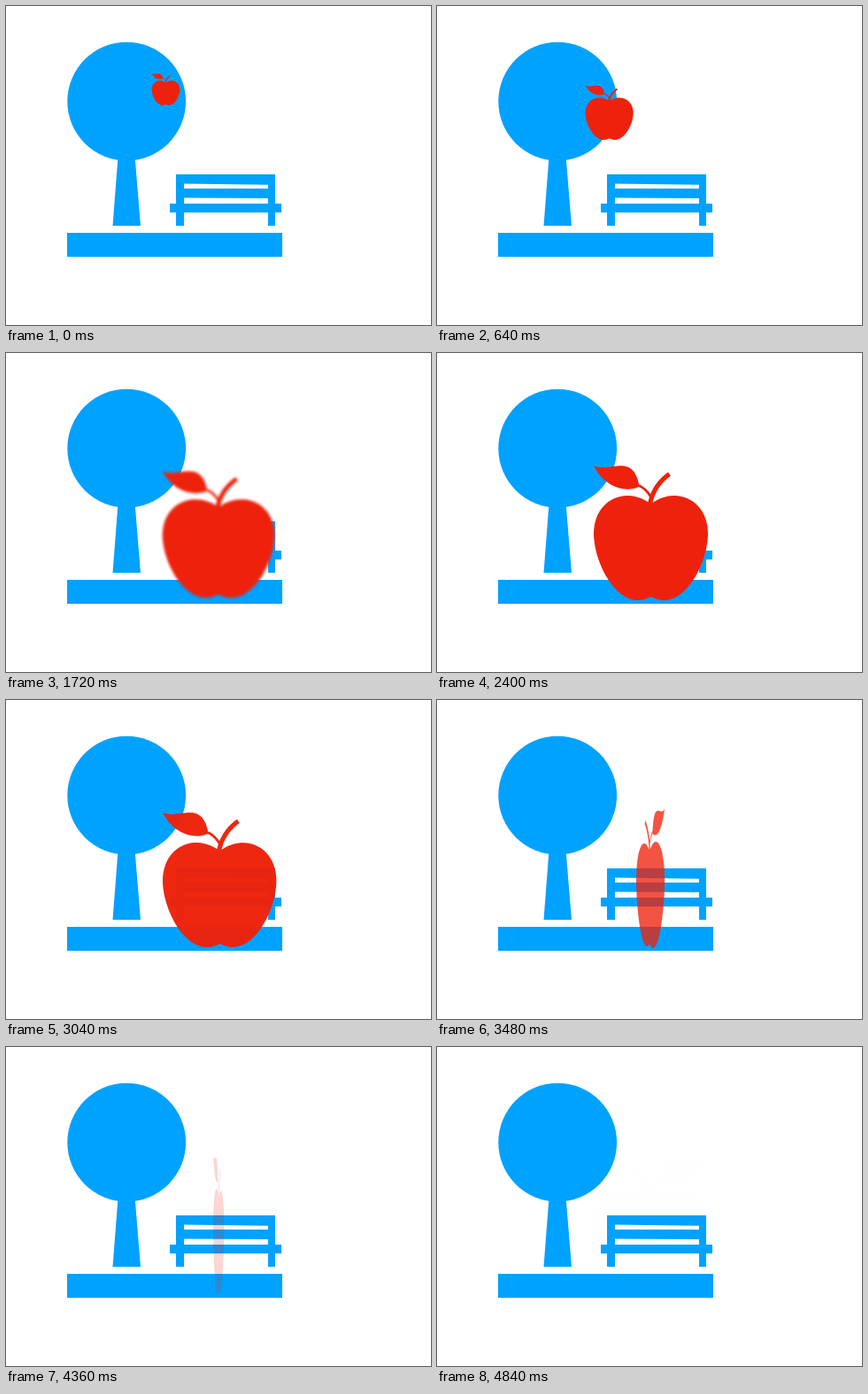
These frames come from a looping animation (480x360 px, 5.08 s). An HTML page with a canvas:

```html
<!DOCTYPE html>
<html lang="en">
<head>
<meta charset="utf-8">
<title>Apple, tree and bench</title>
<style>
  html, body { margin: 0; width: 100%; height: 100%; overflow: hidden; background: #fff; }
  canvas { display: block; width: 480px; height: 360px; }
</style>
</head>
<body>
<canvas id="stage" width="480" height="360"></canvas>
<script>
const ctx = document.getElementById('stage').getContext('2d');
const BLUE = '#00a2ff', RED = '#ee220c';
const LOOP = 5080, STEP = 40, LAST_STEP = 4840;
const VIEW_DISTANCE = 1100;
const AXIS_OFFSET = 1.1; // the apple turns slightly left of its middle
const SEGMENTS = 24;

const mix = (a, b, p) => a + (b - a) * p;
const progress = (t, from, to) => Math.min(1, Math.max(0, (t - from) / (to - from)));
const cosine = u => (1 - Math.cos(Math.PI * u)) / 2;
const smooth = u => u * u * (3 - 2 * u);
const samples = fn => Array.from({ length: SEGMENTS + 1 }, (_, i) => fn(i / SEGMENTS));

// Point on a Bezier curve with any number of control points.
function bezier(points, t) {
  if (points.length === 1) return points[0];
  const next = points.slice(1).map(([x, y], i) =>
    [mix(points[i][0], x, t), mix(points[i][1], y, t)]);
  return bezier(next, t);
}

const curve = (...points) => samples(t => bezier(points, t));

// Band of constant width along a curve.
function band(halfWidth, ...points) {
  const side = sign => samples(t => {
    const [x, y] = bezier(points, t);
    const [x2, y2] = bezier(points, t + 0.01);
    const k = sign * halfWidth / Math.hypot(x2 - x, y2 - y);
    return [x + (y2 - y) * k, y - (x2 - x) * k];
  });
  return [...side(1), ...side(-1).reverse()];
}

// Outlines around the middle of the apple.
const half = [
  ...curve([0, -32], [27, -53], [64, -38], [64.5, 1]),
  ...curve([64.5, 1], [64.5, 36], [35, 92], [0, 72.5])
];
const body = [...half, ...half.map(([x, y]) => [-x, y]).reverse()];
const leafTip = [-64.5, -75.5], leafEnd = [-13, -52];
const leaf = [
  ...curve(leafTip, [-48, -66], [-20, -92], leafEnd),
  ...curve(leafEnd, [-22, -46], [-50, -46], leafTip)
];
const stalk = band(1.4, [-14, -53], [-6, -50], [0, -40]);
const stem = band(2.6, [-1, -32], [3, -53], [21, -66]);
const apple = [body, leaf, stalk, stem];

function polygon(...points) {
  ctx.beginPath();
  points.forEach(([x, y]) => ctx.lineTo(x, y));
  ctx.fill();
}

function drawScene() {
  ctx.fillStyle = BLUE;
  ctx.beginPath();
  ctx.arc(136.2, 107.6, 66.9, 0, Math.PI * 2);
  ctx.fill();
  polygon([126.5, 170], [145.6, 170], [152, 248], [120.5, 248]);

  ctx.fillRect(192, 190, 9, 58);
  ctx.fillRect(296, 190, 8, 58);
  polygon([200, 190], [297, 190], [297, 201.7], [200, 200.5]);
  polygon([200, 206], [297, 206], [297, 217], [200, 216.4]);
  ctx.fillRect(185, 223, 126, 10);
  ctx.fillRect(69, 256, 243, 27);
}

function drawApple(t) {
  const grow = cosine(progress(t, 45, 1905));
  const settle = smooth(progress(t, 1900, 2320));
  const spin = smooth(progress(t, 2930, 4883));
  const fade = smooth(progress(t, 2845, 4930));

  const cx = mix(180.2, 240.4, grow);
  const cy = mix(94, mix(207, 202.5, settle), grow);
  const scale = mix(0.245, 1, grow);
  const squash = mix(0.96, 1, settle);
  const angle = -3 * Math.PI * spin;
  const cos = Math.cos(angle), sin = Math.sin(angle);

  // Turn about the vertical axis, seen in perspective.
  const project = ([x, y]) => {
    const dx = x + AXIS_OFFSET;
    const k = scale / (1 - dx * sin / VIEW_DISTANCE);
    return [cx + dx * cos * k, cy + y * squash * k];
  };

  ctx.save();
  const blur = 1.5 * grow * (1 - settle);
  if (blur > 0) ctx.filter = `blur(${blur}px)`;
  ctx.globalAlpha = 1 - fade;
  ctx.fillStyle = RED;
  ctx.beginPath();
  for (const outline of apple) {
    outline.map(project).forEach(([x, y], i) => i ? ctx.lineTo(x, y) : ctx.moveTo(x, y));
    ctx.closePath();
  }
  ctx.fill();
  ctx.restore();
}

function render(now) {
  const t = Math.min(LAST_STEP, Math.floor((now % LOOP) / STEP) * STEP);
  ctx.fillStyle = '#fff';
  ctx.fillRect(0, 0, 480, 360);
  drawScene();
  drawApple(t);
}

const began = performance.now();
function tick() {
  render(performance.now() - began);
  requestAnimationFrame(tick);
}
tick();
</script>
</body>
</html>
```
